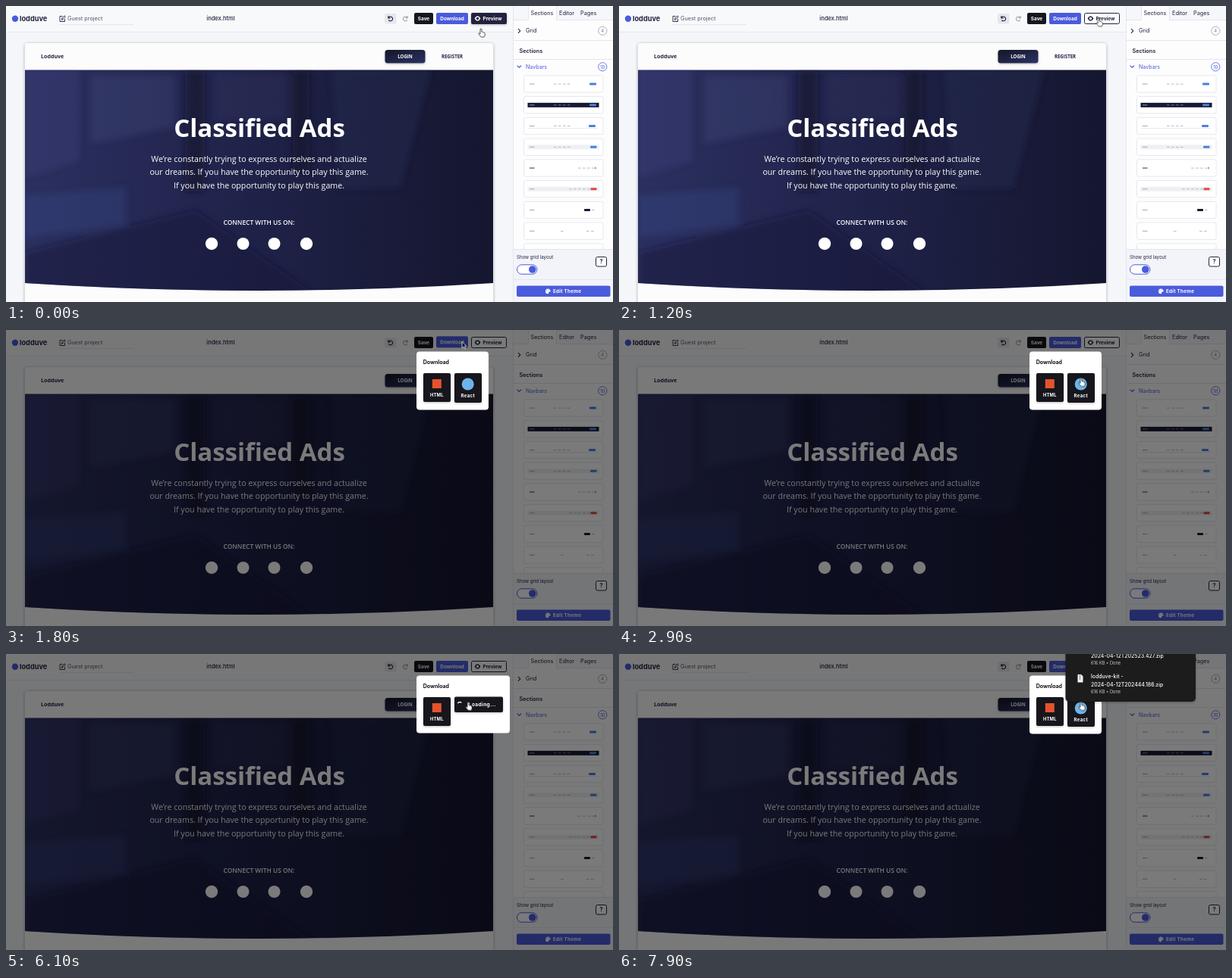
These frames come from a looping animation (800 by 391 pixels, 8 s). An HTML page:

```html
<!DOCTYPE html>
<html lang="en">
<head>
<meta charset="utf-8">
<title>Page builder</title>
<style>
html, body { margin: 0; width: 100%; height: 100%; overflow: hidden; background: #f5f6f9; }
svg { display: block; width: 100vw; height: 100vh; }
text { font: 7.3px Inter, sans-serif; fill: #20243f; }
.open { font-family: "Open Sans", sans-serif; }
.mid { text-anchor: middle; }
.b { font-weight: 700; }
.w { fill: #fff; }
.btn { font-size: 6.4px; font-weight: 700; }
.line { fill: none; stroke: #dfe1ea; stroke-width: .8; }
.icon { fill: none; stroke: #20243f; stroke-width: 1.1; stroke-linecap: round; stroke-linejoin: round; }
.blue { fill: #4a5bdc; }
.lead { font-size: 10.65px; }

.t { animation: 8s step-end infinite; }
.preview-on { animation-name: previewOn; }
.preview-off { animation-name: previewOff; }
.lift { animation-name: lift; }
.open-menu { animation-name: menu; }
.react { animation-name: react; }
.loading { animation-name: loading; }
.arrow { animation-name: arrow; }
.hand { animation-name: hand; }
.toast { animation: toast 8s linear infinite; }
.cursor { animation: move 8s ease-in-out infinite; }

@keyframes previewOn { 0% { opacity: 1 } 14.8%, 100% { opacity: 0 } }
@keyframes previewOff { 0% { opacity: 0 } 14.8%, 100% { opacity: 1 } }
@keyframes lift { 0% { transform: none } 17.3% { transform: translateY(-.7px) } 24.8%, 100% { transform: none } }
@keyframes menu { 0% { opacity: 0 } 22.3%, 100% { opacity: 1 } }
@keyframes react { 0% { opacity: 1 } 37.4% { opacity: 0 } 83.6%, 100% { opacity: 1 } }
@keyframes loading { 0% { opacity: 0 } 37.4% { opacity: 1 } 83.6%, 100% { opacity: 0 } }
@keyframes arrow { 0% { opacity: 0 } 22.3% { opacity: 1 } 31%, 100% { opacity: 0 } }
@keyframes hand { 0% { opacity: 1 } 22.3% { opacity: 0 } 31%, 100% { opacity: 1 } }
@keyframes toast { 0%, 83.6% { opacity: 0 } 85.5%, 100% { opacity: 1 } }
@keyframes move {
  0% { transform: translate(626px, 30px) }
  6%, 13.5% { transform: translate(638px, 16px) }
  19%, 24% { transform: translate(601px, 15.5px) }
  33%, 100% { transform: translate(609px, 63.5px) }
}
</style>
</head>
<body>
<svg viewBox="0 0 800 391" preserveAspectRatio="none">
  <defs>
    <linearGradient id="night">
      <stop offset="0" stop-color="#2c3060"/>
      <stop offset=".45" stop-color="#20234a"/>
      <stop offset="1" stop-color="#15162f"/>
    </linearGradient>
    <linearGradient id="ink" x2="1" y2="1">
      <stop offset="0" stop-color="#141727"/>
      <stop offset="1" stop-color="#2c3363"/>
    </linearGradient>
    <clipPath id="hero"><path d="M25 84.5H642V366Q333 386 25 366Z"/></clipPath>
    <clipPath id="list"><path d="M669 86H800V321H669Z"/></clipPath>
    <filter id="soft" x="-20%" y="-20%" width="140%" height="140%"><feGaussianBlur stdDeviation="4"/></filter>
    <filter id="shade" x="-20%" y="-20%" width="140%" height="150%"><feDropShadow dx="0" dy="1" stdDeviation="1.5" flood-opacity=".25"/></filter>
  </defs>

  <rect width="800" height="391" fill="#f5f6f9"/>

  <!-- page canvas -->
  <rect x="24.5" y="48.5" width="618" height="350" rx="4" fill="#fff" stroke="#dcdee6" filter="url(#shade)"/>
  <rect x="25" y="49" width="617" height="349" rx="4" fill="#fcfcfd"/>
  <text class="open b" x="46" y="69.3" style="font-size:7.1px">Lodduve</text>
  <rect x="499.5" y="58" width="53" height="17.5" rx="3.5" fill="url(#ink)" filter="url(#shade)"/>
  <g class="open b mid">
    <text class="open b w" x="526" y="69" style="font-size:6.1px">LOGIN</text>
    <text class="open b" x="588" y="69" style="font-size:6.1px">REGISTER</text>
  </g>

  <g clip-path="url(#hero)">
    <rect x="25" y="84" width="617" height="300" fill="url(#night)"/>
    <g filter="url(#soft)">
      <path d="M25 84H96V205L25 226Z" fill="#3d437b" opacity=".4"/>
      <path d="M112 92H222V160L112 182Z" fill="#474b78" opacity=".35"/>
      <path d="M236 84H262V245H236ZM378 84H400V220H378Z" fill="#12142d" opacity=".55"/>
      <path d="M275 90H370V150H275Z" fill="#3a3e69" opacity=".3"/>
      <path d="M25 250L158 240V290L25 305Z" fill="#35508f" opacity=".3"/>
      <path d="M430 84H560L520 240H440Z" fill="#2b2e55" opacity=".4"/>
      <path d="M25 325L250 270 420 390H25Z" fill="#171a38" opacity=".5"/>
    </g>
  </g>
  <g class="mid">
    <text class="open b w" x="334" y="173" style="font-size:33px">Classified Ads</text>
    <text class="open w lead" x="333.5" y="206">We’re constantly trying to express ourselves and actualize</text>
    <text class="open w lead" x="333.5" y="223.3">our dreams. If you have the opportunity to play this game.</text>
    <text class="open w lead" x="333.5" y="240.6">If you have the opportunity to play this game.</text>
    <text class="open w" x="333.5" y="289.2" style="font-size:8.4px;font-weight:600">CONNECT WITH US ON:</text>
  </g>
  <g class="w">
    <circle cx="271" cy="314" r="8.2"/><circle cx="312.5" cy="314" r="8"/>
    <circle cx="353.5" cy="314" r="8"/><circle cx="396" cy="314" r="8.2"/>
  </g>

  <!-- top bar -->
  <rect width="668" height="34" fill="#f8f9fb"/>
  <path class="line" d="M0 34.4H668M70 24.5H168"/>
  <circle class="blue" cx="12" cy="16.8" r="4.2"/>
  <text class="b" x="18" y="20" style="font-size:9.2px">lodduve</text>
  <path class="icon" d="M74 13.5H71V20.5H77.5V17.5M73.5 18L74 16 77 12.8 78.3 14 75.3 17.4Z" style="stroke-width:.9"/>
  <text x="81" y="19.3" fill-opacity=".75">Guest project</text>
  <text class="mid" x="283" y="19.4" style="font-size:7.5px;font-weight:500">index.html</text>
  <rect x="499" y="10" width="15.5" height="13.5" rx="2" fill="#e6e7ec"/>
  <path id="undo" class="icon" d="M503.8 13.5V16H506.3M504 15.8A2.9 2.9 0 1 1 504.5 18.8"/>
  <use href="#undo" transform="matrix(-1 0 0 1 1033 0)" opacity=".4"/>
  <rect x="538" y="9" width="25" height="15" rx="2" fill="#15161f"/>
  <text class="btn w mid" x="550.5" y="19">Save</text>
  <g class="t lift">
    <rect class="blue" x="567" y="9" width="42" height="15" rx="2"/>
    <text class="btn w mid" x="588" y="19">Download</text>
  </g>
  <g class="t preview-off">
    <rect x="613.5" y="9.5" width="46" height="14" rx="2" fill="#fff" stroke="#20243f"/>
    <use href="#eye" fill="#20243f"/>
    <text class="btn" x="628.5" y="19">Preview</text>
  </g>
  <g class="t preview-on">
    <rect x="613" y="9" width="47" height="15" rx="2" fill="#20243f" filter="url(#shade)"/>
    <use href="#eye" fill="#fff"/>
    <text class="btn w" x="628.5" y="19">Preview</text>
  </g>
  <defs>
    <path id="eye" fill-rule="evenodd" d="M617.5 16.5Q621.5 10 625.5 16.5 621.5 23 617.5 16.5ZM619.7 16.5a1.8 1.8 0 1 0 3.6 0a1.8 1.8 0 1 0-3.6 0Z"/>
  </defs>

  <!-- sidebar -->
  <rect x="668" width="132" height="391" fill="#fdfdfe"/>
  <path d="M668 0H688V18.5H668ZM725 0H800V18.5H725Z" fill="#f6f7fb"/>
  <path class="line" d="M668.5 0V391M668 18.5H688.5V0M725.5 0V18.5H800M669 45.5H800M669 70.5H800"/>
  <text x="691.5" y="11.8">Sections</text>
  <text x="729" y="11.8">Editor</text>
  <text x="757" y="11.8">Pages</text>
  <path class="icon" d="M675.3 30.3L677.8 32.8 675.3 35.3"/>
  <text x="685" y="35.4">Grid</text>
  <circle cx="786.3" cy="32.8" r="5.6" fill="none" stroke="#9a9db0" stroke-width=".8"/>
  <text class="mid" x="786.3" y="35" style="font-size:6px;fill:#7d8196">4</text>
  <text x="676.5" y="62.4" style="font-weight:600">Sections</text>
  <path class="icon" d="M674 79L676.4 81.4 678.8 79" style="stroke:#4a5bdc"/>
  <text x="685" y="82.8" style="font-size:7.1px;fill:#4a5bdc">Navbars</text>
  <circle cx="786.3" cy="80.3" r="5.6" fill="none" stroke="#4a5bdc" stroke-width=".8"/>
  <text class="mid" x="786.3" y="82.5" style="font-size:6px;fill:#4a5bdc">10</text>
  <g id="thumbs" clip-path="url(#list)"></g>

  <rect x="669" y="321" width="131" height="70" fill="#f3f4f9"/>
  <path class="line" d="M669 321.5H800M669 361.5H800"/>
  <text x="673" y="334" style="font-size:6.1px">Show grid layout</text>
  <rect x="673.5" y="341.8" width="26.5" height="12.4" rx="6.2" fill="#fff" stroke="#4a5bdc"/>
  <circle class="blue" cx="693.8" cy="348" r="4.8"/>
  <rect x="777.5" y="331.5" width="14" height="12.5" rx="2" fill="#fff" stroke="#20243f"/>
  <text class="b mid" x="784.5" y="340.3">?</text>
  <rect class="blue" x="673" y="369.5" width="123.5" height="14.5" rx="2"/>
  <path class="w" fill-rule="evenodd" d="M714.3 373.4a3.4 3.4 0 1 0 .2 6.8q1.2-.4.6-1.7 0-1 1-1h1.4q.5-3.8-3.2-4.1ZM712 376a.6.6 0 1 0 1.2 0a.6.6 0 1 0-1.2 0ZM714.5 375a.6.6 0 1 0 1.2 0a.6.6 0 1 0-1.2 0Z"/>
  <text class="w b" x="721" y="379.2" style="font-size:6.3px;letter-spacing:.25px">Edit Theme</text>

  <!-- download menu -->
  <g class="t open-menu">
    <rect width="800" height="391" opacity=".52"/>
    <rect class="t loading" x="541" y="28.5" width="123" height="76" rx="4" fill="#fff"/>
    <rect class="t react" x="541" y="28.5" width="95" height="77" rx="4" fill="#fff"/>
    <text class="b" x="549.7" y="45.4" style="font-size:7px;fill:#15161f">Download</text>
    <g filter="url(#shade)">
      <rect x="550" y="57" width="36" height="38" rx="2" fill="#15161f"/>
      <g class="t react"><rect x="591" y="57" width="36" height="39" rx="2" fill="#15161f"/></g>
      <g class="t loading"><rect x="591" y="56.5" width="64" height="20.5" rx="2" fill="#15161f"/></g>
    </g>
    <rect x="561.8" y="65" width="12" height="12" fill="#e5532d"/>
    <text class="w b mid" x="567.8" y="88" style="font-size:5.9px;letter-spacing:.1px">HTML</text>
    <g class="t react">
      <circle cx="608.7" cy="71.5" r="8" fill="#6cb5ea"/>
      <text class="w b mid" x="608.8" y="89" style="font-size:6.1px;letter-spacing:.3px">React</text>
    </g>
    <g class="t loading">
      <path d="M595.3 65Q597.5 62.5 600.4 64.3" fill="none" stroke="#fff" stroke-width="1.3"/>
      <text class="w b" x="609.8" y="69.2" style="font-size:6.6px;letter-spacing:.35px">Loading...</text>
    </g>
  </g>

  <!-- finished downloads -->
  <g class="toast">
    <rect x="588.5" y="-12" width="171.5" height="75" rx="5" fill="#1d1d1f" filter="url(#shade)"/>
    <g id="files"></g>
    <path d="M604.5 27H609L611.5 29.5V37.5H604.5Z" fill="#f1f1f3"/>
    <path d="M607.5 28V34" stroke="#1d1d1f" stroke-width="1" stroke-dasharray="1 .8"/>
  </g>

  <g class="cursor">
    <path class="t hand" d="M-1 7V1a1 1 0 0 1 2 0V4.2q1-.3 1.5.5 1-.3 1.5.6 1.2 0 1.2 1.2V8q0 2-1.2 3H.2L-3 7.2q-.6-1 .4-1.3.8 0 1.6 1.1z" fill="#fff" stroke="#111" stroke-width=".7"/>
    <path class="t arrow" d="M0 0V8.2L1.9 6.5 3.2 9.4 4.6 8.8 3.4 6H6Z" fill="#111" stroke="#fff" stroke-width=".7"/>
  </g>
</svg>
<script>
const box = (x, y, w, h, fill, rx = 0) =>
  `<rect x="${x}" y="${y}" width="${w}" height="${h}" rx="${rx}" fill="${fill}"/>`;
const dashes = (x, n, y, fill) =>
  Array.from({ length: n }, (_, i) => box(x + i * 6, y, 3.6, .8, fill)).join('');

// strip colour, menu x, menu items, button x, button width, button colour
const bars = [
  ['none', 722, 4, 769, 9, '#4a7fe0'],
  ['#171a33', 722, 4, 769, 9, '#4a7fe0'],
  ['none', 722, 4, 768, 9, '#4a7fe0'],
  ['#eff0f4', 722, 4, 770, 8.5, '#4a7fe0'],
  ['none', 754, 4, 776.5, 1, '#555'],
  ['#eff0f4', 742, 5, 770.5, 8, '#e0483c'],
  ['none', 772, 1, 762, 8, '#171a33'],
  ['none', 731, 1, 766, 10, 'none'],
  ['none', 722, 4, 769, 9, '#4a7fe0']
];
document.getElementById('thumbs').innerHTML = bars.map(([strip, mx, n, bx, bw, color], i) => {
  const y = 91.8 + i * 27.75, mid = y + 11.3;
  const ink = i === 1 ? '#7d83a8' : '#a9acb9';
  return `<rect x="682.5" y="${y}" width="104.5" height="22.3" rx="2" fill="#fff" stroke="#e0e2ea" stroke-width=".8"/>`
    + box(687.5, mid - 3, 94, 6, strip)
    + (i === 2 ? box(689, mid + 2.6, 91, .6, '#d9dbe4') : '')
    + box(690, mid - .6, 6.5, 1.1, i === 4 ? '#444' : ink)
    + dashes(mx, n, mid - .4, ink)
    + box(bx, mid - 1.5, bw, 3, color, 1)
    + (i === 7 ? dashes(765, 2, mid - .4, ink) : '');
}).join('');

const row = (y, text, size, fill = '#fff', weight = 500) =>
  `<text x="622" y="${y}" style="font-size:${size}px;font-weight:${weight};fill:${fill}">${text}</text>`;
const note = y => row(y, '616 KB • Done', 5.7, '#c9c9cd', 400);
document.getElementById('files').innerHTML =
  row(5, '2024-04-12T202523.427.zip', 6.9) + note(14.2) +
  row(32.3, 'lodduve-kit -', 6.9) + row(43, '2024-04-12T202444.186.zip', 6.9) + note(52);
</script>
</body>
</html>
```
